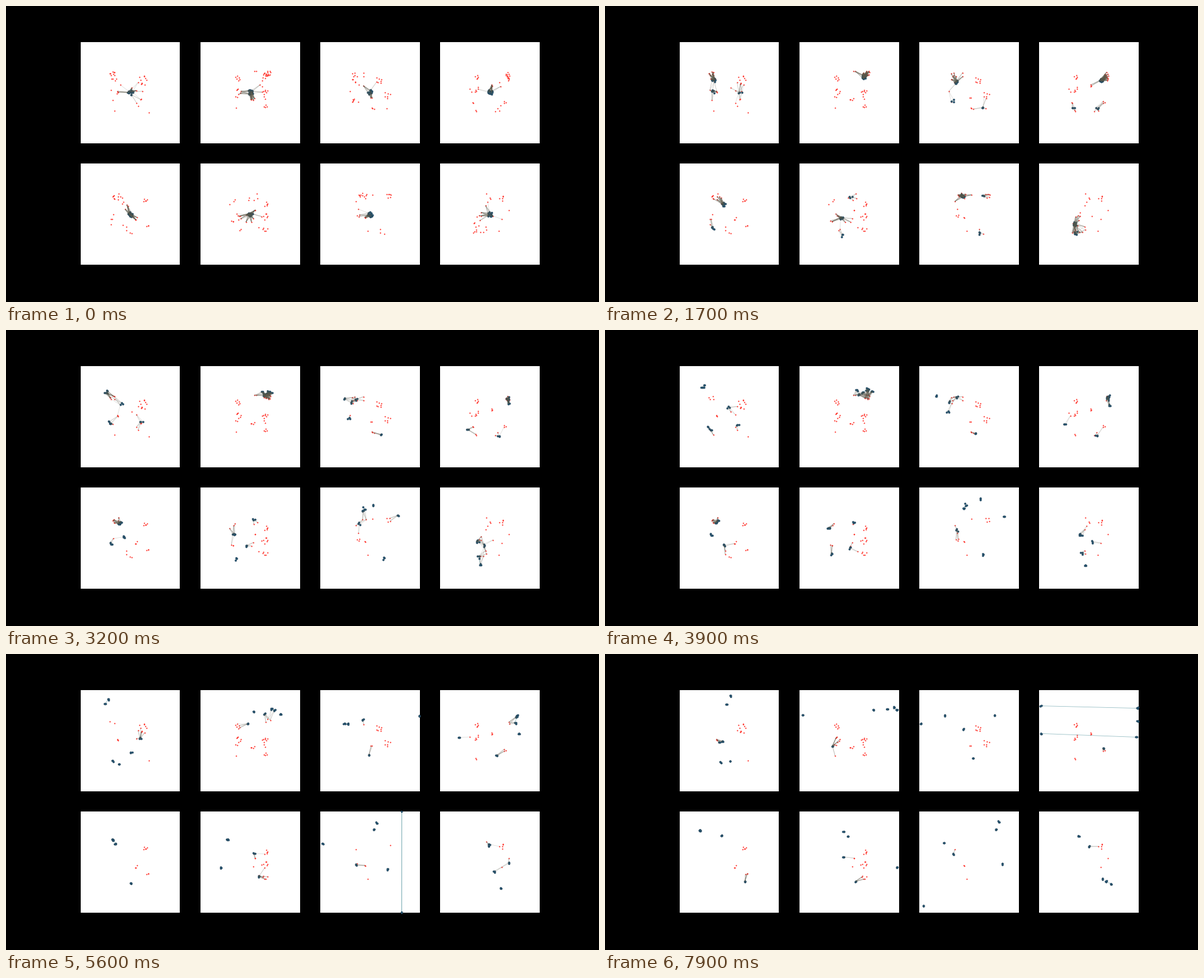
Animation of 1000x500 px, one loop 8000 ms. Source, as a matplotlib script:

```python
import numpy as np
import matplotlib.pyplot as plt
from matplotlib.animation import FuncAnimation
from matplotlib.collections import LineCollection
from matplotlib.patches import Rectangle

FRAMES = 80
KEYS = np.array([0, 17, 56, 79])
SIZE = np.array([167.8, 171])
REACH = 18       # an agent senses food within this distance
NEAR = 11        # agents this close are linked
AGENTS = 18      # per panel, shared out among its tracks
SOWN = 24        # food that is found and eaten
rng = np.random.default_rng(4)

fig = plt.figure(figsize=(10, 5), dpi=100, facecolor="black")
ax = fig.add_axes([0, 0, 1, 1])
ax.set_xlim(0, 1000)
ax.set_ylim(500, 0)
ax.axis("off")

panels = []


def glide(points):
    """Smooth path through the points at KEYS, one row per frame."""
    p = np.array(points, float)
    m = np.gradient(p, KEYS, axis=0)
    f = np.arange(FRAMES)
    i = np.searchsorted(KEYS[1:-1], f, side="right")
    d = np.diff(KEYS)[i][:, None]
    s = (f - KEYS[i])[:, None] / d
    ease = s * s * (3 - 2 * s)
    return (p[i] + ease * (p[i + 1] - p[i])
            + s * (1 - s) * d * ((1 - s) * m[i] - s * m[i + 1]))


def disc(n, radius):
    a = rng.uniform(0, 2 * np.pi, n)
    r = radius * np.sqrt(rng.uniform(0, 1, n))
    return np.column_stack([r * np.cos(a), r * np.sin(a)])


def add_panel(col, row, hubs, clumps):
    """hubs: gathering point -> later points of each track (x, y, x, y).
    clumps: food that stays, as x, y, count."""
    origin = np.array([125.6 + 202.25 * col, 60.6 + 205.8 * row])
    ax.add_patch(Rectangle(origin, *SIZE, color="white", lw=0))

    tracks = [(origin + SIZE / 2, hub, t[:2], t[2:])
              for hub, ts in hubs.items() for t in ts]
    spread = np.interp(np.arange(FRAMES), KEYS, [4.5, 3.5, 1.7, 1.2])[:, None]
    paths = np.stack([glide(t) + spread * off for t in tracks
                      for off in disc(AGENTS // len(tracks), 1)], axis=1)

    # food lies beside the paths, inside a square, until an agent passes
    eaten = rng.integers(9, 62, SOWN)
    who = rng.integers(0, paths.shape[1], SOWN)
    sown = np.clip(paths[eaten, who], origin + 54, origin + 115)
    sown += disc(SOWN, 5)

    stay = [np.array([x, y]) + disc(n, 4 * np.sqrt(n) - 4) for x, y, n in clumps]
    food = np.vstack([sown] + stay)
    ends = np.full(len(food), FRAMES)
    ends[:SOWN] = eaten
    panels.append((origin + (paths - origin) % SIZE, food, ends))


add_panel(0, 0, {
    (183, 125): [(167, 84, 205, 85), (172, 77, 211, 71), (226, 143, 198, 148)],
    (183, 144): [(180, 181, 195, 183), (192, 186, 212, 181)],
    (228, 147): [(211, 167, 193, 149)],
}, [(230, 125, 11), (187, 146, 3), (241, 180, 1)])

add_panel(1, 0, {
    (436, 120): [(407, 117, 383, 155), (417, 98, 452, 95), (436, 101, 476, 93),
                 (448, 93, 487, 90), (453, 95, 492, 94), (463, 103, 501, 104)],
}, [(392, 121, 6), (390, 147, 8), (437, 150, 9), (438, 171, 4), (417, 158, 4),
    (388, 172, 1)])

add_panel(2, 0, {
    (593, 129): [(529, 105, 489, 104), (602, 111, 605, 127), (577, 118, 573, 104)],
    (587, 161): [(571, 118, 533, 118)],
    (635, 172): [(611, 171, 620, 176)],
}, [(630, 124, 7), (643, 150, 6), (616, 155, 2)])

add_panel(3, 0, {
    (837, 126): [(862, 104, 898, 91), (861, 107, 903, 88), (859, 117, 898, 114),
                 (865, 135, 903, 135)],
    (790, 174): [(764, 142, 728, 141)],
    (829, 172): [(827, 171, 840, 159)],
}, [(795, 118, 5), (795, 142, 5), (819, 134, 3), (792, 177, 2), (840, 163, 3)])

add_panel(0, 1, {
    (200, 335): [(180, 314, 160, 298), (185, 321, 197, 307), (211, 387, 236, 384)],
    (182, 375): [(180, 314, 160, 298)],
}, [(234, 330, 5), (220, 359, 3), (239, 371, 3)])

add_panel(1, 1, {
    (399, 358): [(373, 313, 402, 300), (375, 314, 410, 308), (427, 376, 423, 384)],
    (399, 387): [(362, 361, 324, 360)],
    (414, 323): [(418, 337, 402, 343)],
}, [(436, 335, 5), (420, 346, 2), (437, 355, 7), (438, 378, 5), (417, 359, 1)])

add_panel(2, 1, {
    (603, 320): [(621, 296, 660, 296), (625, 285, 664, 283), (667, 265, 705, 254),
                 (591, 356, 588, 338)],
    (636, 320): [(701, 320, 739, 319)],
    (631, 385): [(643, 364, 670, 355)],
}, [(590, 330, 1), (605, 358, 2), (610, 380, 1)])

add_panel(3, 1, {
    (792, 368): [(815, 321, 799, 307), (813, 324, 816, 325), (848, 353, 839, 380)],
    (794, 383): [(835, 395, 854, 388), (823, 368, 845, 384)],
}, [(837, 325, 5), (848, 345, 1), (836, 360, 1)])

food_dots = ax.scatter([], [], s=2.2, color="#ff1e14", lw=0, zorder=2)
agent_dots = ax.scatter([], [], s=5, facecolor="#2a5c7c", edgecolor="#203f52",
                        lw=0.4, zorder=3)
food_links = LineCollection([], colors=[(0.36, 0.35, 0.29, 0.22)],
                            linewidths=0.5, zorder=4)
agent_links = LineCollection([], colors=[(0.2, 0.5, 0.55, 0.5)],
                             linewidths=0.6, zorder=2.5)
ax.add_collection(food_links)
ax.add_collection(agent_links)


def draw(frame):
    dots, reds, to_food, to_agent = [], [], [], []
    for agents, spots, ends in panels:
        a, f = agents[frame], spots[frame < ends]
        dots.append(a)
        reds.append(f)
        gap = np.linalg.norm(a[:, None] - f[None], axis=2)
        to_food += [(a[i], f[j]) for i, j in zip(*np.where(gap < REACH))]
        # distance measured across the wrapping edges
        step = np.abs(a[1:] - a[:-1])
        near = np.hypot(*np.minimum(step, SIZE - step).T) < NEAR
        to_agent += [(a[i], a[i + 1]) for i in np.where(near)[0]]
    agent_dots.set_offsets(np.vstack(dots))
    food_dots.set_offsets(np.vstack(reds))
    food_links.set_segments(to_food)
    agent_links.set_segments(to_agent)
    return food_dots, agent_dots, food_links, agent_links


anim = FuncAnimation(fig, draw, frames=FRAMES, interval=100, repeat=True,
                     repeat_delay=0, blit=False)
plt.show()
```
